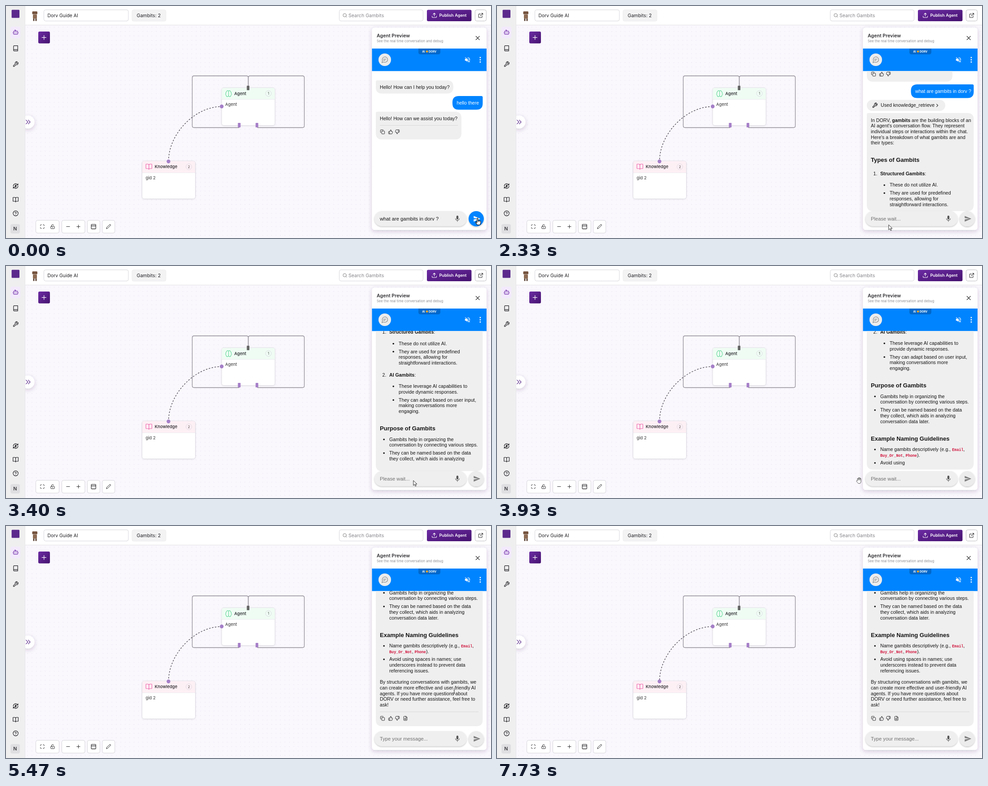
An HTML page for the animation above (7800 ms loop, 1082 by 518 pixels).

```html
<!DOCTYPE html>
<html lang="en">
<head>
<meta charset="utf-8">
<title>Agent builder</title>
<style>
  html, body { margin: 0; width: 100%; height: 100%; overflow: hidden; background: #fff; }
  svg { display: block; width: 100vw; height: 100vh; }
  text { white-space: pre; }
  .ui { font-family: Inter, "Open Sans", sans-serif; }
  .chat { font-family: "Liberation Sans", Arial, sans-serif; }
  .code { font: bold 8.45px "Liberation Mono", monospace; fill: #d0143c; }
</style>
</head>
<body>
<svg id="stage" viewBox="0 0 1082 518" xmlns="http://www.w3.org/2000/svg"></svg>
<script>
const LOOP = 7.8, FPS = 15;
const BLUE = '#0084ff', GREY = '#efefef', INK = '#1f1f23';

const ICONS = {
  copy: 'M10 8h10a2 2 0 0 1 2 2v10a2 2 0 0 1-2 2H10a2 2 0 0 1-2-2V10a2 2 0 0 1 2-2zM4 16a2 2 0 0 1-2-2V4a2 2 0 0 1 2-2h10a2 2 0 0 1 2 2',
  thumb: 'M7 10v12M15 5.9 14 10h5.8a2 2 0 0 1 1.9 2.6l-2.3 8A2 2 0 0 1 17.5 22H4a2 2 0 0 1-2-2v-8a2 2 0 0 1 2-2h2.8a2 2 0 0 0 1.8-1.1L12 2a3.1 3.1 0 0 1 3 3.9Z',
  doc: 'M15 2H6a2 2 0 0 0-2 2v16a2 2 0 0 0 2 2h12a2 2 0 0 0 2-2V7ZM14 2v6h6M8 13h8M8 17h8',
  book: 'M4 19.5v-15A2.5 2.5 0 0 1 6.5 2H20v20H6.5a2.5 2.5 0 0 1 0-5H20',
  wrench: 'M14.7 6.3a1 1 0 0 0 0 1.4l1.6 1.6a1 1 0 0 0 1.4 0l3.8-3.8a6 6 0 0 1-7.9 7.9l-6.9 6.9a2.1 2.1 0 0 1-3-3l6.9-6.9a6 6 0 0 1 7.9-7.9z',
  bot: 'M12 8V4H8M6 8h12a2 2 0 0 1 2 2v8a2 2 0 0 1-2 2H6a2 2 0 0 1-2-2v-8a2 2 0 0 1 2-2zM2 14h2M20 14h2M15 13v2M9 13v2',
  open: 'M12 7v14M3 18a1 1 0 0 1-1-1V4a1 1 0 0 1 1-1h5a4 4 0 0 1 4 4 4 4 0 0 1 4-4h5a1 1 0 0 1 1 1v13a1 1 0 0 1-1 1h-6a3 3 0 0 0-3 3 3 3 0 0 0-3-3z',
  help: 'M22 12a10 10 0 1 1-20 0 10 10 0 0 1 20 0zM9.1 9a3 3 0 0 1 5.8 1c0 2-3 3-3 3M12 17h.01',
  usage: 'M3 12a9 9 0 0 1 15-6.7L21 8M21 3v5h-5M21 12a9 9 0 0 1-15 6.7L3 16M8 16H3v5M14.5 9.5c-1-1.5-5-1.2-5 .8 0 2.6 5 1 5 3.5 0 2-4 2.3-5 .7M12 7v10',
  search: 'M19 11a8 8 0 1 1-16 0 8 8 0 0 1 16 0zM21 21l-4.3-4.3',
  upload: 'M12 15V3M7 8l5-5 5 5M21 15v4a2 2 0 0 1-2 2H5a2 2 0 0 1-2-2v-4',
  external: 'M15 3h6v6M10 14 21 3M18 13v6a2 2 0 0 1-2 2H5a2 2 0 0 1-2-2V8a2 2 0 0 1 2-2h6',
  brain: 'M12 5a3 3 0 1 0-6 .1 4 4 0 0 0-2.5 5.8 4 4 0 0 0 .6 6.6A4 4 0 1 0 12 18ZM12 5a3 3 0 1 1 6 .1 4 4 0 0 1 2.5 5.8 4 4 0 0 1-.6 6.6A4 4 0 1 1 12 18Z',
  expand: 'M3 8V5a2 2 0 0 1 2-2h3M16 3h3a2 2 0 0 1 2 2v3M21 16v3a2 2 0 0 1-2 2h-3M8 21H5a2 2 0 0 1-2-2v-3',
  unlock: 'M5 11h14a2 2 0 0 1 2 2v7a2 2 0 0 1-2 2H5a2 2 0 0 1-2-2v-7a2 2 0 0 1 2-2zM7 11V7a5 5 0 0 1 9.9-1M12 15v3',
  panel: 'M5 3h14a2 2 0 0 1 2 2v14a2 2 0 0 1-2 2H5a2 2 0 0 1-2-2V5a2 2 0 0 1 2-2zM3 9h18',
  pencil: 'M17 3a2.8 2.8 0 1 1 4 4L7.5 20.5 2 22l1.5-5.5z',
  bubble: 'M21 11.5a8.4 8.4 0 0 1-12.3 7.5L3 21l1.9-5.7A8.5 8.5 0 1 1 21 11.5zM8 10h8M8 14h5',
  minus: 'M4 12h16', plus: 'M4 12h16M12 4v16', close: 'M4 4l16 16M20 4 4 20',
  right: 'M9 5l7 7-7 7', twice: 'M4 4l8 8-8 8M13 4l8 8-8 8'
};
const SOLID = {
  mic: 'M12 15a3.5 3.5 0 0 0 3.5-3.5V5a3.5 3.5 0 0 0-7 0v6.5A3.5 3.5 0 0 0 12 15zM18 11.5a6 6 0 0 1-12 0H4.3a7.7 7.7 0 0 0 6.8 7.6V23h1.8v-3.9a7.7 7.7 0 0 0 6.8-7.6z',
  send: 'M2 21 23 12 2 3v7l15 2-15 2z',
  muted: 'M16.5 12a4.5 4.5 0 0 0-2.5-4v2.2l2.5 2.5zM19 12c0 .9-.2 1.8-.5 2.6l1.5 1.5a9 9 0 0 0-6-12.9v2.1A7 7 0 0 1 19 12zM4.3 3 3 4.3 7.7 9H3v6h4l5 5v-6.7l4.3 4.2a7 7 0 0 1-2.3 1.2v2.1a9 9 0 0 0 3.7-1.8l2 2 1.3-1.3zM12 4 9.9 6.1 12 8.2z'
};

const at = (x, y, size, inner, turn = 0) =>
  `<g transform="translate(${x} ${y}) rotate(${turn}) scale(${size / 24}) translate(-12 -12)">${inner}</g>`;
const icon = (name, x, y, size, color = INK, w = 2, turn = 0) =>
  at(x, y, size, `<path d="${ICONS[name]}" fill="none" stroke="${color}" stroke-width="${w}" stroke-linecap="round" stroke-linejoin="round"/>`, turn);
const solid = (name, x, y, size, color) => at(x, y, size, `<path d="${SOLID[name]}" fill="${color}"/>`);
const rect = (x, y, w, h, r, fill, more = '') =>
  `<rect x="${x}" y="${y}" width="${w}" height="${h}" rx="${r}" fill="${fill}" ${more}/>`;
const box = (x, y, w, h, r = 4) => rect(x, y, w, h, r, '#fff', 'stroke="#d6d4da"');
const disc = (x, y, r, fill, more = '') => `<circle cx="${x}" cy="${y}" r="${r}" fill="${fill}" ${more}/>`;
const ui = (x, y, s, size, fill = INK, weight = 400) =>
  `<text class="ui" x="${x}" y="${y}" font-size="${size}" font-weight="${weight}" fill="${fill}">${s}</text>`;
const chat = (x, y, s, size = 10.65, fill = '#151515') =>
  `<text class="chat" x="${x}" y="${y}" font-size="${size}" fill="${fill}">${s}</text>`;

// Speech bubble: the corner next to the speaker stays tight.
function bubble(x, y, w, h, mine = false, r = Math.min(14, h / 2)) {
  const a = mine ? r : 3, b = mine ? 3 : r;
  return `<path fill="${mine ? BLUE : GREY}" d="M${x + a} ${y}h${w - a - b}q${b} 0 ${b} ${b}v${h - b - r}q0 ${r} ${-r} ${r}` +
    `h${2 * r - w}q${-r} 0 ${-r} ${-r}v${r + a - h}q0 ${-a} ${a} ${-a}z"/>`;
}
const reactions = y => icon('copy', 840, y, 11) + icon('thumb', 858, y, 11) + icon('thumb', 873, y, 11, INK, 2, 180);

// Answer blocks: text x, centre of first line, marker, lines. Headings use '#'.
const LINE = 12.7;
const rows = [
  [834, 384, '', 'In DORV, **gambits** are the building blocks of an|AI agent\'s conversation flow. They represent|individual steps or interactions within the chat.|Here\'s a breakdown of what gambits are and|their types:'],
  [834, 473, '#', 'Types of Gambits'],
  [855, 503.3, '1.', '**Structured Gambits**:'],
  [876, 528.7, '•', 'These do not utilize AI.'],
  [876, 546.5, '•', 'They are used for predefined|responses, allowing for|straightforward interactions.'],
  [855, 598.5, '2.', '**AI Gambits**:'],
  [876, 624, '•', 'These leverage AI capabilities to|provide dynamic responses.'],
  [876, 654.5, '•', 'They can adapt based on user input,|making conversations more|engaging.'],
  [834, 718.5, '#', 'Purpose of Gambits'],
  [855, 742.5, '•', 'Gambits help in organizing the|conversation by connecting various steps.'],
  [855, 773, '•', 'They can be named based on the data|they collect, which aids in analyzing|conversation data later.'],
  [834, 837, '#', 'Example Naming Guidelines'],
  [855, 861, '•', 'Name gambits descriptively (e.g., `Email`,|`Buy_Or_Not`, `Phone`).'],
  [855, 891, '•', 'Avoid using spaces in names; use|underscores instead to prevent data|referencing issues.'],
  [834, 942, '', 'By structuring conversations with gambits, we|can create more effective and user-friendly AI|agents. If you have more questions about|DORV or need further assistance, feel free to|ask!']
].flatMap(([x, y, mark, text]) =>
  text.split('|').map((s, i) => ({ x, y: y + i * LINE, mark: i ? '' : mark, words: s.split(' ') })));

function rich(s) {
  return s.split(/(\*\*|`)/).reduce((o, part) => {
    if (part === '**') o.bold = !o.bold;
    else if (part === '`') o.code = !o.code;
    else if (part) o.out += o.code ? `<tspan class="code">${part}</tspan>`
      : o.bold ? `<tspan font-weight="bold">${part}</tspan>` : part;
    return o;
  }, { out: '' }).out;
}
function rowSvg({ x, y, mark, words }, part) {
  const n = Math.floor(words.length * part + 1e-6);
  if (!n) return '';
  const s = words.slice(0, n).join(' ');
  if (mark === '#') return chat(x, y + 4.5, `<tspan font-weight="bold">${s}</tspan>`, 13.05);
  const sign = mark === '•' ? disc(x - 11.8, y + .3, 1.8, '#151515') : mark ? chat(x - 15.5, y + 3.7, mark) : '';
  return sign + chat(x, y + 3.7, rich(s));
}

const ease = k => k * k * (3 - 2 * k);
function track(keys, t, curve = k => k) {
  const i = keys.findIndex(k => k[0] > t);
  if (i < 0) return keys[keys.length - 1].slice(1);
  if (!i) return keys[0].slice(1);
  const a = keys[i - 1], b = keys[i], k = curve((t - a[0]) / (b[0] - a[0]));
  return a.slice(1).map((v, j) => v + (b[j + 1] - v) * k);
}

const SENT = .26, USED = 1.66, DONE = 4.93, READY = 5;
const STREAM = [[1.73, 0], [2.325, 10], [2.332, 11], [2.36, 11], [2.75, 18], [2.9, 18],
  [3.897, 26], [3.94, 26.4], [4.65, 33], [4.76, 33], [4.79, 34]];
const WHEEL = [[5.6, 593.5], [6.15, 382], [6.42, 382], [7, 593.5]];
const CURSOR = [[0, 1053, 481], [.27, 1053, 481], [.58, 955, 521], [.79, 876, 509], [1.68, 876, 509], [2.2, 877, 495],
  [2.47, 877, 495], [2.8, 922, 486], [3.3, 922, 486], [3.85, 808, 479], [4.08, 808, 479], [4.6, 175, 540],
  [5.29, 175, 540], [5.3, 1000, 370], [6.45, 1000, 370], [7.02, 150, 540]];

const streamed = t => track(STREAM, t)[0];
function answerEnd(t) {
  if (t >= DONE) return 1040.5;
  const last = rows[Math.ceil(streamed(t)) - 1];
  return last ? last.y + (last.mark === '#' ? 19 : 15) : 363;
}
function scrollAt(t) {
  if (t > 5.2) return track(WHEEL, t, ease)[0];
  let sum = 0;
  for (let i = 0; i < 7; i++) sum += Math.max(0, answerEnd(t - i * .01) - 447);
  return sum / 7;
}

function messages(t) {
  let s = bubble(825, 166, 173, 29.5) + chat(834, 184.5, 'Hello! How can I help you today?')
    + bubble(996, 201, 67.5, 30.5, true) + chat(1005.5, 219.8, 'hello there', 10.65, '#fff')
    + bubble(825, 236, 191, 62) + chat(834, 254.8, 'Hello! How can we assist you today?')
    + rect(834, 266, 174, .8, 0, '#d2d2d2') + reactions(281);
  if (t < SENT) return s;
  s += bubble(923.5, 304, 140, 30.5, true) + chat(933, 322.8, 'what are gambits in dorv ?', 10.65, '#fff');
  if (t < USED) {
    s += bubble(825, 338.5, 42, 25);
    for (let i = 0; i < 3; i++) {
      const k = Math.max(0, Math.sin((t * 1.2 - i * .16) * 2 * Math.PI));
      s += disc(837.5 + i * 8, 353 - 4 * k, 2.6, '#8b8b8b', `opacity="${.5 + .5 * k}"`);
    }
    return s;
  }
  s += rect(825, 338.5, 175, 24.8, 12.4, GREY) + icon('wrench', 843, 350.8, 13, INK, 2.2)
    + chat(856, 354.3, 'Used knowledge_retrieve') + icon('right', 982, 351, 10, INK, 2.6);
  const r = streamed(t);
  if (r > 0) {
    s += bubble(825, 368, 238.5, answerEnd(t) - 368);
    rows.forEach((row, i) => { if (r > i) s += rowSvg(row, Math.min(1, r - i)); });
  }
  if (t >= DONE) s += rect(834, 1008, 220, .8, 0, '#d2d2d2') + reactions(1023) + icon('doc', 891, 1023, 11);
  return s;
}

function composer(t) {
  const fresh = t < SENT;
  const label = fresh ? 'what are gambits in dorv ?' : t < READY ? 'Please wait...' : 'Type your message...';
  return `<g filter="url(#soft)">${rect(822, 458, 205.5, 33.5, 16.8, GREY)}${disc(1049, 475, 17, fresh ? BLUE : '#ececec')}</g>`
    + chat(834, 478.8, label, 11.2, fresh ? '#151515' : '#707070')
    + solid('mic', 1007, 474.5, 15, '#555') + solid('send', 1050.5, 475, 17, fresh ? '#fff' : '#808080');
}

function cursor(t) {
  const [x, y] = track(CURSOR, t, ease);
  const shape = (d, size, w = 1.5) => at(x, y, size,
    `<path d="${d}" fill="#fff" stroke="#111" stroke-width="${w}" stroke-linejoin="round"/>`);
  if (x < 817 || y > 500)
    return shape('M6 13V6.5a1.5 1.5 0 0 1 3 0V4a1.5 1.5 0 0 1 3 0 1.5 1.5 0 0 1 3 0v2a1.5 1.5 0 0 1 3 .5V15c0 4-2 7-6 7s-5-2-9-8c0-2 2-2 3-1zM9 6.5V11M12 4v7M15 5v6', 16, 1.1);
  if (y < 458)
    return at(x, y, 14, '<path d="M9 4q3 0 3 2v12q0 2-3 2M15 4q-3 0-3 2M15 20q-3 0-3-2M10 15h4" fill="none" stroke="#222" stroke-width="1.5"/>');
  if (x > 1032)
    return shape('M9 11V3.5a1.5 1.5 0 0 1 3 0V9l6 1.5a2 2 0 0 1 2 2V16c0 3-2 6-3 6.5H10c-2-3-5-6.5-5.5-8 0-1.5 2-1.5 3 0L9 16zM12 9v4M15 10v3', 18);
  return shape('M6.5 1v19l4.5-4.2 3 7 3.2-1.4-3-6.8h6.2z', 14);
}

function node(x, y, title, id, body, tint, art) {
  return `<g filter="url(#faint)">${rect(x, y, 119, 84.5, 5, '#fff', 'stroke="#dddbe2"')}</g>`
    + `<path d="M${x + .5} ${y + 26}v-21q0-4.5 4.5-4.5h109q4.5 0 4.5 4.5v21z" fill="${tint}"/>`
    + rect(x, y + 26, 119, .7, 0, '#e6e2e8') + art
    + ui(x + 28.3, y + 16.3, title, 9.4, INK, 500)
    + disc(x + 104.5, y + 13, 6.5, 'none', 'stroke="#d9d5dc" stroke-width=".8"')
    + `<text class="ui" x="${x + 104.5}" y="${y + 15.8}" font-size="7.5" text-anchor="middle" fill="#444">${id}</text>`
    + ui(x + 8, y + 41, body, 9.4, '#333');
}

const loopEdge = dir => {
  const X = n => 540.5 + dir * n;
  return `M540.5 182V160Q540.5 156 ${X(4)} 156H${X(121)}Q${X(125)} 156 ${X(125)} 160V267.5Q${X(125)} 271.5 ${X(121)} 271.5H${X(20)}`;
};

const defs = `<defs>
  <pattern id="dots" x="43" y="42" width="9.9" height="9.9" patternUnits="userSpaceOnUse"><circle cx="5" cy="5" r=".5" fill="#cfc6da"/></pattern>
  <linearGradient id="violet" x2="1" y2="1"><stop stop-color="#6c2ba3"/><stop offset="1" stop-color="#45136f"/></linearGradient>
  <clipPath id="view"><rect x="817" y="145.300" width="255" height="312.700"/></clipPath>
  <clipPath id="work"><rect x="43" y="43" width="1039" height="475"/></clipPath>
  <filter id="soft" x="-10%" y="-30%" width="120%" height="180%"><feDropShadow dx="0" dy="1.5" stdDeviation="1.5" flood-opacity=".25"/></filter>
  <filter id="faint" x="-10%" y="-10%" width="120%" height="125%"><feDropShadow dx="0" dy="1" stdDeviation="1.5" flood-opacity=".08"/></filter>
  <filter id="lift" x="-40%" y="-40%" width="180%" height="180%"><feDropShadow dx="0" dy="3" stdDeviation="5" flood-color="#3a2a50" flood-opacity=".2"/></filter>
</defs>`;

const canvas = rect(43, 42, 1039, 476, 0, '#faf7fd') + rect(43, 42, 1039, 476, 0, 'url(#dots)')
  + rect(72, 57, 26, 26.5, 3, 'url(#violet)') + icon('plus', 84.8, 70.3, 14, '#fff')
  + `<g clip-path="url(#work)"><g filter="url(#lift)">${disc(49, 259, 14.5, '#fff')}</g></g>` + icon('twice', 49, 259, 13, '#5b2a8c', 2.2)
  + node(481, 182.3, 'Agent', 1, 'Agent', '#effcf4', icon('brain', 496.5, 195.5, 16, '#5fd698', 1.6))
  + node(303.5, 346, 'Knowledge', 2, 'gid 2', '#fdf0f5', icon('open', 318.8, 359, 16, '#ee64ab', 1.7))
  + [-1, 1].map(d => `<path d="${loopEdge(d)}" fill="none" stroke="#918d95" stroke-width="1.3"/>`).join('')
  + '<path id="flow" d="M362.6 346.5C362.6 285.5 421.5 224.5 481 224.5" fill="none" stroke="#45404a" stroke-width="1.3" stroke-dasharray="3.3"/>'
  + disc(362.5, 347, 4.2, '#a57fc8') + disc(481.2, 224.3, 4.2, '#a57fc8')
  + rect(537.2, 178, 5.8, 10, .8, '#666')
  + [520.3, 559.8].map(x => rect(x - 3, 261, 6, 10, .8, '#a57fc8')).join('')
  + box(66.5, 478.5, 52, 28.5) + icon('expand', 81, 492.5, 11) + icon('unlock', 104, 492.5, 11)
  + box(124.5, 478.5, 51.5, 28.5) + icon('minus', 138.5, 492.5, 11) + icon('plus', 161.5, 492.5, 11)
  + box(181.5, 478.5, 28, 28.5) + icon('panel', 195.3, 492.5, 13.5)
  + box(214.8, 478.5, 28, 28.5) + icon('pencil', 228.7, 492.5, 11.5);

const topBar = rect(43, 0, 1039, 42, 0, '#fff') + rect(43, 42, 1039, .8, 0, '#dedbe2')
  + rect(58.5, 12, 11.5, 6.5, 1.5, '#75543f') + rect(60, 19, 9, 9, 1.5, '#8d6a52')
  + rect(60.5, 28, 3, 5.5, .8, '#5b4335') + rect(65.5, 28, 3, 5.5, .8, '#5b4335')
  + box(84.5, 8.5, 188.5, 25) + ui(92.5, 25, 'Dorv Guide AI', 10.4)
  + rect(281, 8.5, 76, 25.5, 4, '#f3f3f4', 'stroke="#e6e6e8" stroke-width=".6"') + ui(291.5, 25, 'Gambits: 2', 10.6)
  + box(743.5, 8.5, 187, 25) + icon('search', 756, 21, 11, '#777') + ui(764, 25, 'Search Gambits', 10.6, '#858389')
  + rect(939, 8.5, 99.5, 25.5, 3, 'url(#violet)') + icon('upload', 955.5, 20.8, 13, '#fff') + ui(966.5, 24.3, 'Publish Agent', 9.1, '#fff', 600)
  + rect(1046.5, 8.5, 25, 25, 4, '#fff', 'stroke="#bdbbc0"') + icon('external', 1059, 21, 12.5, '#333');

const sideBar = rect(0, 0, 42.5, 518, 0, '#efeff0') + rect(42, 0, .7, 518, 0, '#e0dfe3')
  + rect(12.5, 8.5, 17.5, 18, 1.5, '#5b2a8c')
  + rect(10, 46, 22, 26, 4, '#f3e9fc') + icon('bot', 21.5, 58.5, 14, '#7433ab')
  + icon('book', 21.5, 94.5, 14) + icon('wrench', 21.5, 130, 14)
  + icon('usage', 21.5, 402, 14) + icon('open', 21.5, 432.5, 14) + icon('help', 21.5, 463, 13.5)
  + rect(10, 487, 21, 21, 4, '#dfdfe2') + ui(16.2, 501.3, 'N', 10.6, INK, 500);

const panel = `<g filter="url(#lift)">${rect(816.5, 48, 255.5, 452, 6, '#fff')}</g>`
  + ui(827, 70.3, 'Agent Preview', 10.6, '#303034', 600)
  + ui(827, 81.3, 'See the real time conversation and debug', 7.55, '#8d8b92')
  + icon('close', 1052.3, 71.5, 12, '#333', 2.2)
  + rect(816.5, 95, 255.5, 50.3, 0, BLUE)
  + '<path d="M920 95h49v8q0 5-5 5h-39q-5 0-5-5z" fill="#0068cc"/>'
  + ui(928.5, 103.8, 'AI', 6, '#fff', 700) + disc(939.2, 101.6, 2.4, '#f5a623') + ui(943, 103.8, 'DORV', 6, '#fff', 700)
  + disc(845, 120, 14, '#ececec') + icon('bubble', 845, 120, 17, '#8b8b8b', 1.6)
  + solid('muted', 1029.5, 120, 15, '#fff') + [115, 120, 125].map(y => disc(1058, y, 1.5, '#fff')).join('');

const stage = document.getElementById('stage');
stage.innerHTML = defs + canvas + topBar + sideBar + panel
  + '<g clip-path="url(#view)"><g id="log"></g></g><g id="composer"></g><g id="cursor"></g>';
const [flow, log, foot, mouse] = ['flow', 'log', 'composer', 'cursor'].map(id => document.getElementById(id));

function draw(t) {
  flow.setAttribute('stroke-dashoffset', 6.6 * (1 - (t / .5) % 1));
  log.innerHTML = messages(t);
  log.setAttribute('transform', `translate(0 ${-scrollAt(t)})`);
  foot.innerHTML = composer(t);
  mouse.innerHTML = cursor(t);
}

const start = performance.now();
let shown = -1;
function tick() {
  const t = ((performance.now() - start) / 1000) % LOOP;
  const step = Math.floor((t + .005) * FPS) % (LOOP * FPS);
  if (step !== shown) draw((shown = step) / FPS);
  requestAnimationFrame(tick);
}
tick();
</script>
</body>
</html>
```
